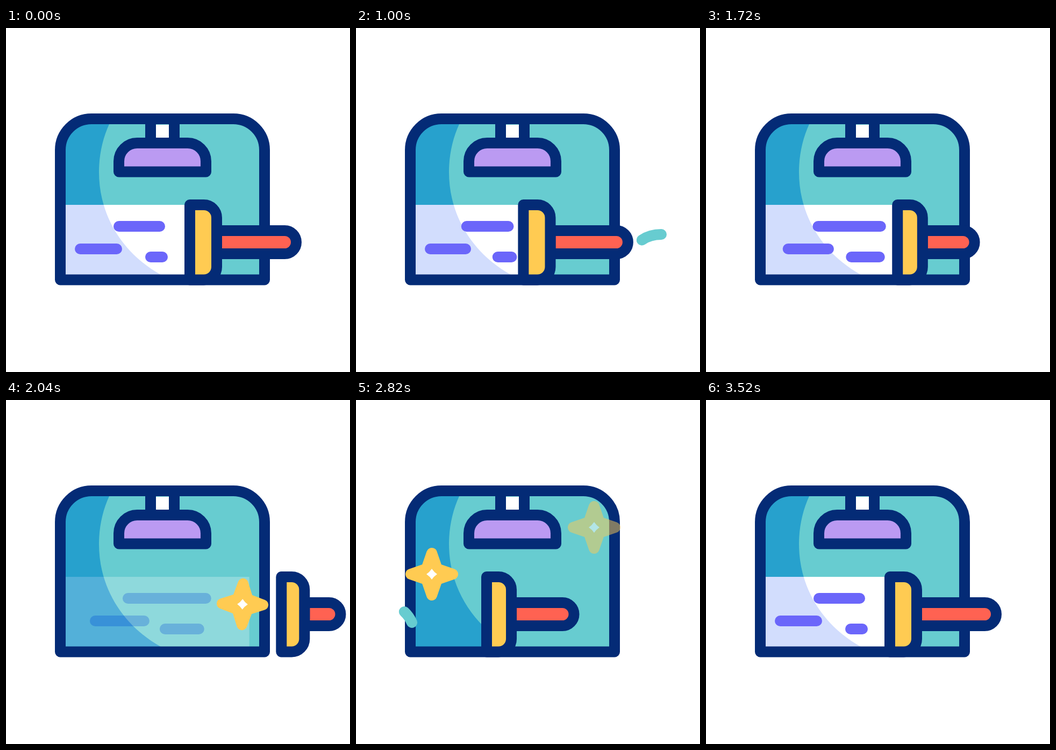
An HTML page that plays this animation: 640 px wide and 640 px high, repeating every 3600 ms.

```html
<!DOCTYPE html>
<html lang="en">
<head>
<meta charset="utf-8">
<title>Window wipe</title>
<style>
  html, body { margin: 0; width: 100%; height: 100%; overflow: hidden; background: #fff; }
  svg { display: block; width: 100vw; height: 100vh; }
  .ink { stroke: #042b76; stroke-width: 20; stroke-linejoin: round; }
  .line { stroke: #6b66fa; stroke-width: 20; stroke-linecap: round; }
  .trail { fill: none; stroke: #67ccd0; stroke-width: 20; stroke-linecap: round; }
  .star { fill: #ffcb52; stroke: #ffcb52; stroke-width: 20; stroke-linejoin: round; }
</style>
</head>
<body>
<svg viewBox="0 0 640 640" fill="none">
  <defs>
    <path id="frame" d="M101 468.5V227a58 58 0 0 1 58-58H423a58 58 0 0 1 58 58V468.5Z"/>
    <path id="shade" d="M192 179C180 205 173 236 173 268C173 350 218 420 288 459L290 466H101V169H196Z"/>
    <clipPath id="inside"><use href="#frame"/></clipPath>
    <clipPath id="sheetClip"><rect id="sheetBox" x="105" y="329" width="200" height="136"/></clipPath>
  </defs>

  <use href="#frame" fill="#67ccd0"/>
  <g clip-path="url(#inside)">
    <use href="#shade" fill="#27a1cd"/>
    <g id="sheet">
      <g clip-path="url(#sheetClip)">
        <rect x="101" y="329" width="380" height="138" fill="#fff"/>
        <use href="#shade" fill="#d2ddfd"/>
      </g>
      <path class="line"/><path class="line"/><path class="line"/>
    </g>
  </g>
  <use href="#frame" class="ink"/>

  <rect x="269" y="180" width="44" height="34" fill="#fff"/>
  <path class="ink" d="M269 169V214M313 169V214"/>
  <path class="ink" fill="#bb9af2" d="M210 267.5V248a34 34 0 0 1 34-34H338a34 34 0 0 1 34 34V267.5Z"/>

  <path id="left" class="trail" pathLength="1" d="M104 414C94 392 75 379 48 379"/>
  <path id="right" class="trail" pathLength="1" d="M512 419C522 397 541 384 568 384"/>

  <path id="handle" class="ink" fill="#ff6252"/>
  <path id="head" class="ink" fill="#ffcb52"/>
  <g id="stars"></g>
</svg>

<script>
const LOOP = 3600;
const $ = id => document.getElementById(id);
const lines = [...document.querySelectorAll(".line")];
const lineY = [369, 411, 426];

// head left, head width, handle tip, sheet edge, then both ends of each line
const REST  = [332, 70, 550, 350, 200, 296, 128, 216, 259, 301];
const LEFT  = [174, 70.5, 374, 306, 178, 283, 128, 206, 232, 293];
const AWAY  = [503, 63, 633, 453, 217, 382, 156, 267, 286, 369];
const CLEAN = [174, 66.7, 368, ...LEFT.slice(3)];
const keys = [
  [0, REST], [360, LEFT], [860, REST], [1360, LEFT], [2060, AWAY],
  [2310, AWAY], [3010, CLEAN], [3520, REST], [LOOP, REST]
];

const stars = [
  { x: 440, y: 380, start: 1820, fade: 2360 },
  { x: 443, y: 237, start: 2200, fade: 2720 },
  { x: 141, y: 324, start: 2500, fade: 3020 }
];

// smooth 0..1 ramp between two times
function ramp(t, from, to) {
  const p = Math.min(1, Math.max(0, (t - from) / (to - from)));
  return p * p * (3 - 2 * p);
}

function pose(t) {
  let i = 0;
  while (i < keys.length - 2 && t >= keys[i + 1][0]) i++;
  const [t0, a] = keys[i], [t1, b] = keys[i + 1];
  const p = ramp(t, t0, t1);
  return a.map((v, k) => v + (b[k] - v) * p);
}

for (const s of stars) {
  const g = document.createElementNS("http://www.w3.org/2000/svg", "g");
  g.innerHTML =
    '<path class="star" d="M0-39L10-10L39 0L10 10L0 39L-10 10L-39 0L-10-10Z"/>' +
    '<path fill="#fff" d="M0-10Q4-4 10 0Q4 4 0 10Q-4 4-10 0Q-4-4 0-10Z"/>';
  $("stars").append(g);
  s.el = g;
}

function drawBrush(x, w, tip) {
  const l = x + 10, r = x + w - 10;
  $("head").setAttribute("d",
    `M${l} 329H${r - 24}a24 24 0 0 1 24 24V444.5a24 24 0 0 1-24 24H${l}Z`);
  $("handle").setAttribute("d",
    `M${r} 377H${tip - 31.5}a21.5 21.5 0 0 1 0 43H${r}Z`);
}

function drawTrail(id, t, hits) {
  const hit = hits.find(h => t > h - 250 && t < h + 300);
  let a = 0, b = 0;
  if (hit !== undefined) {
    a = ramp(t, hit, hit + 300);
    b = ramp(t, hit - 250, hit + 40);
  }
  const el = $(id);
  el.style.display = b - a > 0.004 ? "" : "none";
  el.setAttribute("stroke-dasharray", `${Math.max(0.001, b - a)} 2`);
  el.setAttribute("stroke-dashoffset", -a);
}

function drawStar(s, t) {
  const p = ramp(t, s.start, s.start + 240);
  const o = 1 - ramp(t, s.fade, s.fade + 200);
  s.el.style.display = p > 0 && o > 0 ? "" : "none";
  s.el.setAttribute("opacity", o);
  s.el.setAttribute("transform",
    `translate(${s.x} ${s.y}) rotate(${90 * (1 - p)}) scale(${p})`);
}

function render(t) {
  const [x, w, tip, edge, ...ends] = pose(t);
  drawBrush(x, w, tip);
  $("sheetBox").setAttribute("width", edge - 105);
  lines.forEach((el, i) =>
    el.setAttribute("d", `M${ends[2 * i] + 10} ${lineY[i]}H${ends[2 * i + 1] - 10}`));
  $("sheet").setAttribute("opacity", 1 - ramp(t, 1840, 2140) + ramp(t, 3010, 3310));
  drawTrail("left", t, [360, 1360, 2955]);
  drawTrail("right", t, [860]);
  stars.forEach(s => drawStar(s, t));
}

const begin = performance.now();
function tick() {
  render((performance.now() - begin) % LOOP);
  requestAnimationFrame(tick);
}
tick();
</script>
</body>
</html>
```
